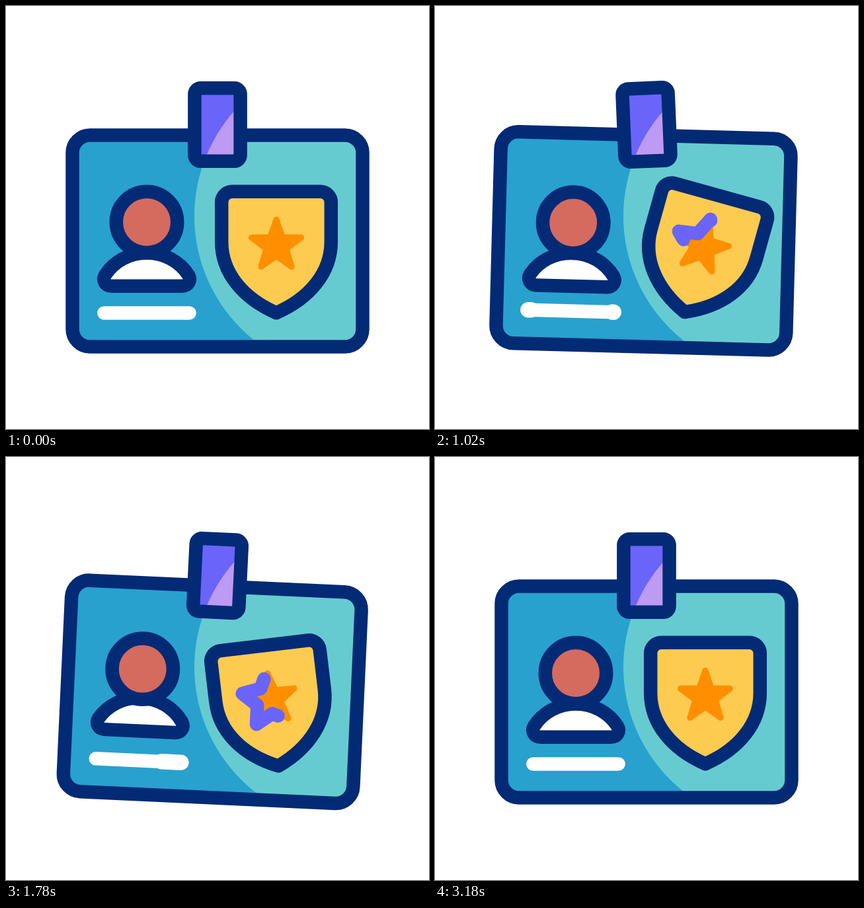
Animation, 640 px wide and 640 px high, one loop 3600 ms. Source, as an HTML page with a canvas:

```html
<!DOCTYPE html>
<html lang="en">
<head>
<meta charset="utf-8">
<title>Swinging badge</title>
<style>
html, body { margin: 0; width: 100%; height: 100%; overflow: hidden; background: #fff; }
canvas { display: block; width: 640px; height: 640px; }
</style>
</head>
<body>
<canvas id="stage" width="640" height="640"></canvas>
<script>
const ctx = document.getElementById('stage').getContext('2d');
const LOOP = 3600, STEP = 20, LINE = 20.5;
const NAVY = '#032a75', BLUE = '#28a1cf', TEAL = '#66cbd0', VIOLET = '#6a64fa',
  LILAC = '#bd9af3', SKIN = '#d56b5e', YELLOW = '#fdcb50', ORANGE = '#ff8f00';

// Keys are [ms, value] pairs, eased between neighbours.
const SWING = [[0, 0], [700, 13], [1330, -9.4], [1960, 5.6], [2475, -1.8], [2960, 0]];
const HOLDER = [[0, 0], [660, 6.4], [1200, -5.5], [1800, 2.8], [2400, -0.6], [3000, 0]];
const SHIELD = [[0, 0], [350, -6], [940, 15], [1650, -11.5], [2240, 5.4], [2720, -0.9], [3180, 0]];
const HEAD = [[0, 0], [770, 12.4], [1250, -4], [1780, -1.3], [2180, 0]];
const BODY = [[0, 0], [780, 0], [1300, 7], [1780, -4], [2200, 1.2], [2680, 0.5], [3180, 0]];
const SWEEPS = [0, 940];

function smooth(x) {
  x = Math.min(1, Math.max(0, x));
  return x * x * (3 - 2 * x);
}

function track(keys, t) {
  for (let i = 1; i < keys.length; i++) {
    const [a, from] = keys[i - 1], [b, to] = keys[i];
    if (t < b) return from + (to - from) * smooth((t - a) / (b - a));
  }
  return keys[keys.length - 1][1];
}

function box(x, y, w, h, r) {
  const p = new Path2D();
  p.roundRect(x, y, w, h, r);
  return p;
}

function disc(x, y, r) {
  const p = new Path2D();
  p.arc(x, y, r, 0, Math.PI * 2);
  return p;
}

function starPoints(outer, inner) {
  return Array.from({ length: 11 }, (_, i) => {
    const a = (i * 36 - 90) * Math.PI / 180, r = i % 2 ? inner : outer;
    return [409 + r * Math.cos(a), 362.5 + r * Math.sin(a)];
  });
}

// Part of a polyline with equal segments, from fraction a to fraction b.
function trim(pts, a, b) {
  const n = pts.length - 1, p = new Path2D();
  const at = f => {
    const i = Math.min(n - 1, Math.floor(f * n)), k = f * n - i;
    return pts[i].map((v, j) => v + (pts[i + 1][j] - v) * k);
  };
  p.moveTo(...at(a));
  for (let i = 1; i < n; i++) if (i / n > a && i / n < b) p.lineTo(...pts[i]);
  p.lineTo(...at(b));
  return p;
}

const card = box(100.5, 195.5, 439, 320, 26.5);
const holder = box(285.4, 124.3, 69.2, 110.5, 9);
const glare = disc(525, 318, 240);
const head = disc(213, 327, 46.2);
const body = new Path2D('M160 423.7C150 423.7 145.5 415 150 407C163 387 186 373.5 213 373.5' +
  'C240 373.5 263 387 276 407C280.5 415 276 423.7 266 423.7Z');
const shield = new Path2D('M342.2 280.8H475.8A16 16 0 0 1 491.8 296.8V357C491.8 403 460 442 409 464.3' +
  'C358 442 326.2 403 326.2 357V296.8A16 16 0 0 1 342.2 280.8Z');
const bar = [[148.3, 464.4], [277.6, 464.4]];
const star = trim(starPoints(39.5, 15.8), 0, 1);
star.closePath();
const rim = starPoints(43.5, 22);

function turn(deg, x, y) {
  ctx.translate(x, y);
  ctx.rotate(deg * Math.PI / 180);
  ctx.translate(-x, -y);
}

function stroke(path, color, width = LINE) {
  ctx.strokeStyle = color;
  ctx.lineWidth = width;
  ctx.stroke(path);
}

function shape(path, fill, line = NAVY, width = LINE) {
  ctx.fillStyle = fill;
  ctx.fill(path);
  stroke(path, line, width);
}

function group(draw) {
  ctx.save();
  draw();
  ctx.restore();
}

// Panel turns, while the light patch inside it keeps its place.
function panel(path, deg, x, y, fill, light) {
  group(() => {
    turn(deg, x, y);
    ctx.fillStyle = fill;
    ctx.fill(path);
    ctx.clip(path);
    turn(-deg, x, y);
    ctx.fillStyle = light;
    ctx.fill(glare);
  });
  group(() => {
    turn(deg, x, y);
    stroke(path, NAVY);
  });
}

function sweep(pts, t, headAt, tailAt, time, color, width) {
  for (const begin of SWEEPS) {
    const u = t - begin;
    const b = smooth((u - headAt) / time), a = smooth((u - tailAt) / time);
    if (b - a > 0.002) stroke(trim(pts, a, b), color, width);
  }
}

function render(t) {
  const swing = track(SWING, t);
  ctx.fillStyle = '#fff';
  ctx.fillRect(0, 0, 640, 640);
  ctx.lineCap = ctx.lineJoin = 'round';
  panel(card, swing, 320, 186, BLUE, TEAL);

  group(() => {
    turn(swing, 320, 186);
    group(() => {
      ctx.translate(0, track(BODY, t));
      shape(body, '#fff');
    });
    group(() => {
      ctx.translate(0, track(HEAD, t));
      shape(head, SKIN);
    });
    stroke(trim(bar, 0, 1), '#fff');
    sweep(bar, t, 0, 330, 740, '#fff', 23.5);

    turn(track(SHIELD, t), 409, 366);
    shape(shield, YELLOW);
    shape(star, ORANGE, ORANGE, 9);
    sweep(rim, t, 40, 400, 920, VIOLET, LINE);
  });

  panel(holder, track(HOLDER, t), 320, 179.5, VIOLET, LILAC);
}

const start = performance.now();
function tick() {
  const t = (performance.now() - start) % LOOP;
  render(Math.floor(t / STEP) * STEP);
  requestAnimationFrame(tick);
}
tick();
</script>
</body>
</html>
```
